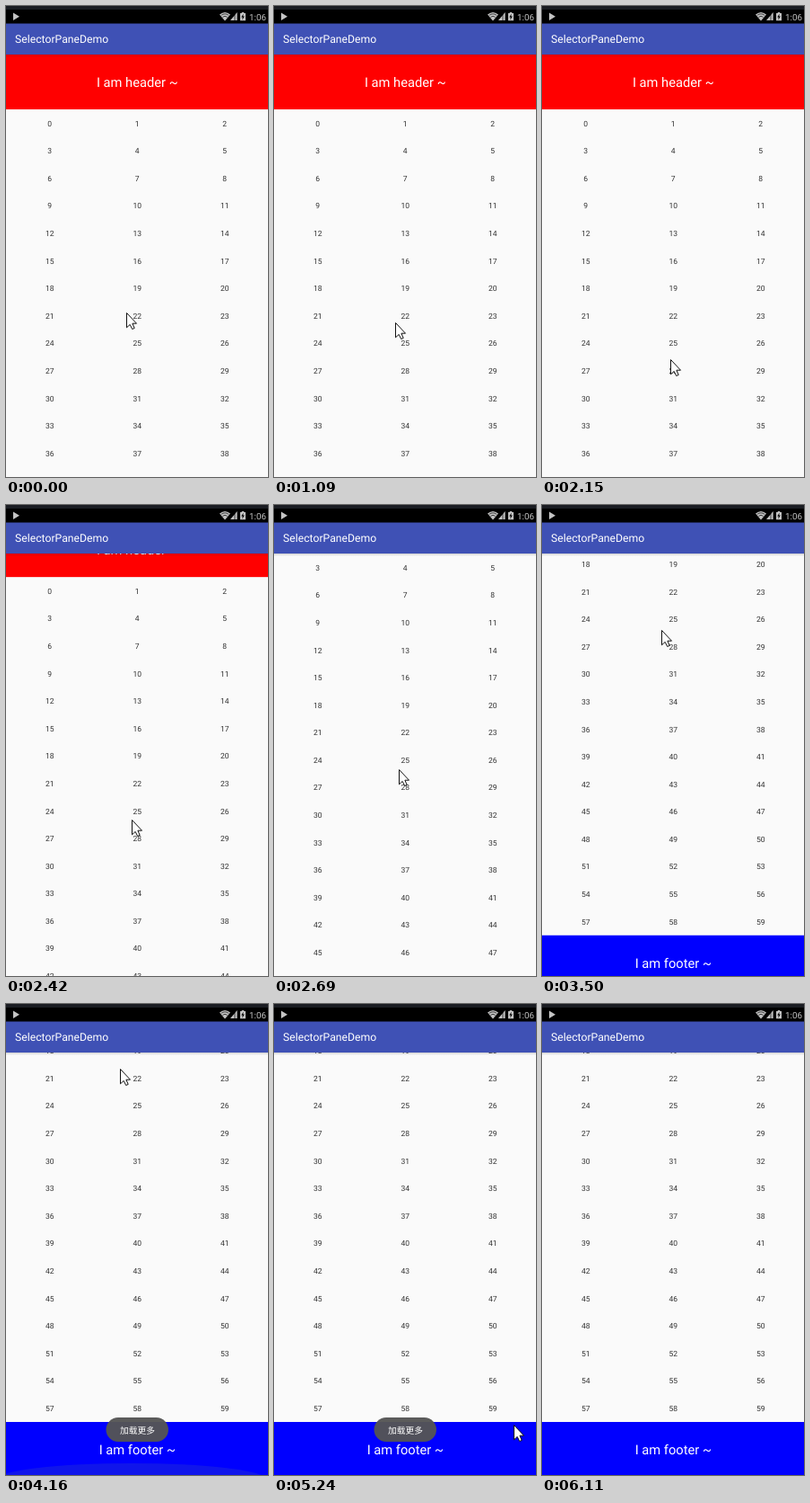
Animation, 292 px wide and 524 px high, one loop 6.26 s. Source, as an HTML page:

```html
<!DOCTYPE html>
<html lang="zh-CN">
<head>
<meta charset="utf-8">
<title>List with header and footer</title>
<style>
  html, body { margin: 0; width: 100%; height: 100%; overflow: hidden; background: #fafafa; }
  svg { display: block; width: 292px; height: 524px; }
  text { font-family: Roboto, sans-serif; text-rendering: geometricPrecision; }
  .mid { text-anchor: middle; }
  .band { font-size: 14.7px; fill: #fff; }
  .cell { font-size: 8.56px; fill: #333; }
  .toast { font-family: "Noto Sans CJK SC", "Noto Sans CJK", sans-serif; font-size: 9.75px; fill: #fff; }
</style>
</head>
<body>
<svg viewBox="0 0 292 524">
  <defs>
    <linearGradient id="shade" x2="0" y2="1">
      <stop stop-color="#000" stop-opacity=".16"/>
      <stop offset="1" stop-color="#000" stop-opacity="0"/>
    </linearGradient>
  </defs>
  <rect width="292" height="524" fill="#fafafa"/>

  <g id="list">
    <rect y="50" width="292" height="65" fill="#f00"/>
    <text class="band mid" x="146.3" y="90">I am header ~</text>
    <g id="cells"></g>
    <rect y="726.9" width="292" height="62" fill="#00f"/>
    <text class="band mid" x="146.3" y="763">I am footer ~</text>
  </g>
  <ellipse id="glow" cx="140" cy="529" rx="150" ry="18" fill="#3f51b5"/>

  <rect y="54" width="292" height="3" fill="url(#shade)"/>
  <rect y="19" width="292" height="35" fill="#3f51b5"/>
  <text x="10" y="41.2" font-size="12.23" fill="#fff">SelectorPaneDemo</text>

  <rect width="292" height="19.5" fill="#000"/>
  <rect width="292" height="4" fill="#1b1d23"/>
  <g fill="#c4c4c4">
    <path d="M8 7.5L15 11.8L8 16Z"/>
    <path d="M238 9.6Q244 4.6 250 9.6L244 16.5Z"/>
    <path d="M250 16L257.6 7V16Z"/>
    <path d="M261 8H262.7V7H265.3V8H267V16.3H261Z"/>
    <text x="271" y="15.6" font-size="9.8">1:06</text>
  </g>
  <path d="M239.8 10.4Q244 7.2 248.2 10.4M241.4 12.3Q244 10.4 246.6 12.3M255 8V16" fill="none" stroke="#000" stroke-width=".7"/>
  <path d="M264.6 8.8L262.2 12.6H263.7L263.3 15.4L265.8 11.6H264.2Z" fill="#000"/>

  <g id="toast">
    <rect x="111.5" y="460" width="69.5" height="27" rx="13.5" fill="#555" fill-opacity=".96"/>
    <text class="toast mid" x="146.5" y="477.7">加载更多</text>
  </g>
  <path id="cursor" d="M.5 .5V16.8L4.2 13.4L6.7 18.5L9.2 17.4L6.9 12.2H11.5Z" fill="#fff" stroke="#111" stroke-linejoin="round"/>
</svg>
<script>
const LOOP = 6260, TICK = 133.6, ROW = 30.585, MAX_SCROLL = 261.9;
const DRAG_END = 31, LIFT = 36;   // in ticks
const $ = id => document.getElementById(id);
const clamp = (v, lo, hi) => Math.min(hi, Math.max(lo, v));

// Turning points of the pointer: tick, x, y.
const path = [
  [0, 133.6, 341], [7, 133.6, 341], [12, 143, 396], [16, 143, 393],
  [18, 140, 350], [23, 138, 209.7], [25, 134, 141.5], [26, 133, 138.8],
  [DRAG_END, 127, 72], [LIFT - 1, 127, 72], [LIFT, 223, 283], [39, 267, 468]
];

function pointer(k) {
  const i = path.findIndex(p => p[0] > k);
  if (i < 0) return path.at(-1).slice(1);
  const [a, b] = [path[i - 1], path[i]];
  const f = (k - a[0]) / (b[0] - a[0]);
  return [1, 2].map(n => a[n] + (b[n] - a[n]) * f);
}

function addCells() {
  for (let i = 0; i < 60; i++) {
    const cell = document.createElementNS("http://www.w3.org/2000/svg", "text");
    cell.setAttribute("class", "cell mid");
    cell.setAttribute("x", 48.7 + i % 3 * 97.5);
    cell.setAttribute("y", 133.7 + Math.floor(i / 3) * ROW);
    cell.textContent = i;
    $("cells").append(cell);
  }
}

function draw(t) {
  const k = Math.floor(t / TICK);   // the screen refreshes once per tick
  const [x, y] = pointer(k).map(Math.round);
  const pull = 1.01 * (384.5 - pointer(Math.min(k, DRAG_END))[1]);
  const scroll = k < 16 ? 0 : clamp(pull, 0, MAX_SCROLL);
  const over = k < LIFT ? Math.max(0, pull - MAX_SCROLL) : 0;
  $("list").setAttribute("transform", `translate(0 ${-scroll})`);
  $("cursor").setAttribute("transform", `translate(${x} ${y})`);
  $("cursor").setAttribute("opacity", t < 5390 ? 1 : 0);
  $("glow").setAttribute("opacity", over * .005);
  $("toast").setAttribute("opacity", k < DRAG_END ? 0 : clamp((6100 - t) / 460, 0, 1));
}

addCells();
const start = performance.now();
function frame() {
  draw((performance.now() - start) % LOOP);
  requestAnimationFrame(frame);
}
frame();
</script>
</body>
</html>
```
